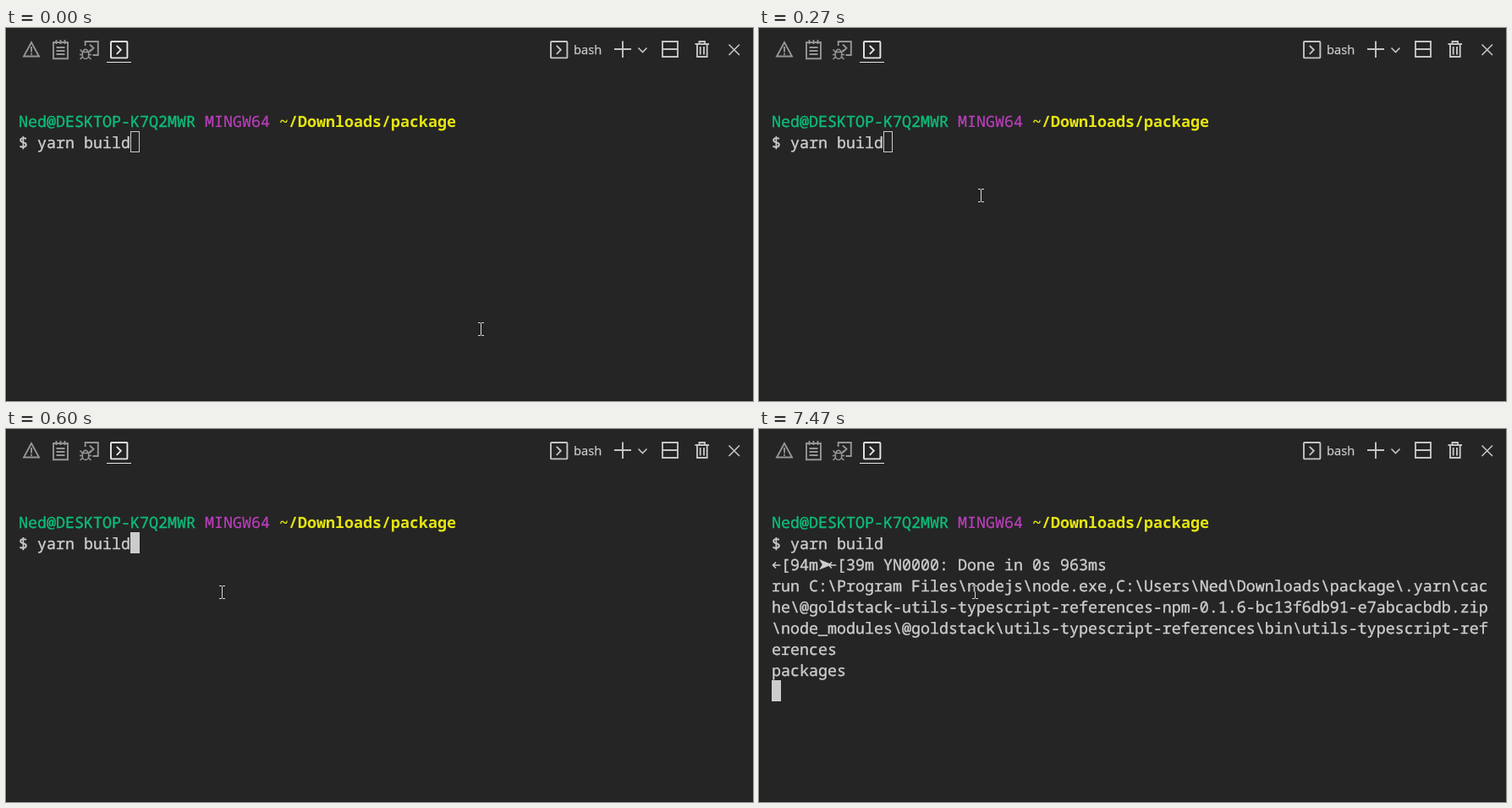
Write an HTML page that moves like this. It is 883 px wide and 441 px high and loops after 8000 ms.

```html
<!DOCTYPE html>
<html lang="en">
<head>
<meta charset="utf-8">
<title>Terminal build</title>
<style>
  html, body { margin: 0; width: 100%; height: 100%; overflow: hidden; background: #252525; }
  svg { display: block; width: 883px; height: 441px; }
  .term text { font: 18.333px "Noto Sans Mono", monospace; white-space: pre; fill: #ccc; stroke: #ccc;
    stroke-width: .4; font-variant-ligatures: none; text-rendering: geometricPrecision; }
  .term .user { fill: #0dbc79; stroke: #0dbc79; }
  .term .system { fill: #bc3fbc; stroke: #bc3fbc; stroke-width: .2; }
  .term .path { fill: #e5e510; stroke: none; font-weight: 700; }
  .label { font: 14.7px "Open Sans", sans-serif; fill: #ccc; stroke: #ccc; stroke-width: .25; }
  .icon { fill: none; stroke: #c5c5c5; stroke-width: 1.9; }
  .dim { stroke: #959595; }
  .active { stroke: #e7e7e7; }
  #pointer { mix-blend-mode: difference; fill: #fff; shape-rendering: crispEdges; }
</style>
</head>
<body>
<svg viewBox="0 0 883 441">
  <defs>
    <g id="shell">
      <rect x="1" y="1" width="19.4" height="19.4" rx="1"/>
      <path d="M7.8 5.8l5 5-5 5"/>
    </g>
  </defs>
  <rect width="883" height="441" fill="#252525"/>
  <path d="M.5 0V441M0 440.5H883" stroke="#1e1e1e"/>

  <!-- panel tabs -->
  <g class="icon dim">
    <path d="M30 17L39 33.5H21ZM30 22V28.5M30 29.8V31.8"/>
    <path d="M56 17H73V36.2H56ZM59.5 14V19M64.5 14V19M69.5 14V19M59.5 23H69.5M59.5 27H69.5M59.5 31H69.5"/>
    <path d="M93.7 21V16H108.8V32H102.5M99 19.5l4.5 4.3-4.5 4.3"/>
    <path d="M90.3 28.5H97.7V32.5a3.7 4 0 0 1-7.4 0ZM91.3 28.5a2.7 3.2 0 0 1 5.4 0M87 31.5H90.3M97.7 31.5H101M87.5 25.5l3 3M100.5 25.5l-3 3M87.5 37l3-3M100.5 37l-3-3" stroke-width="1.6"/>
  </g>
  <use href="#shell" x="123" y="15" class="icon active"/>
  <rect x="119" y="40" width="29" height="1" fill="#e7e7e7"/>

  <!-- panel actions -->
  <use href="#shell" x="643" y="15" class="icon"/>
  <text class="label" x="671" y="31">bash</text>
  <g class="icon">
    <path d="M729 15.5V35M719 25H739"/>
    <path d="M747.5 23.5l5 5 5-5" stroke-width="1.6"/>
    <path d="M776 16H794V34H776ZM776 25H794"/>
    <path d="M814.5 19H831M819.5 18.5V16H826V18.5M817 19V34H828.7V19M820.7 22V31.5M825 22V31.5"/>
    <path d="M854.5 19.5l12.5 12.5M867 19.5L854.5 32" stroke-width="1.6"/>
  </g>

  <g class="term">
    <text x="15" y="117"><tspan class="user">Ned@DESKTOP-K7Q2MWR</tspan> <tspan class="system">MINGW64</tspan> <tspan class="path">~/Downloads/package</tspan></text>
    <text x="15" y="142">$ yarn build</text>
    <g id="done">
      <text x="15" y="167"> [94m  [39m YN0000: Done in 0s 963ms</text>
      <path d="M71 154L86.5 160.3 71 166.5 74.8 160.3Z" fill="#ccc"/>
      <path id="arrow" d="M25.3 161H16.5M20 157.5l-3.5 3.5 3.5 3.5" fill="none" stroke="#ccc" stroke-width="1.6"/>
      <use href="#arrow" x="66"/>
    </g>
    <g id="run">
      <text x="15" y="192">run C:\Program Files\nodejs\node.exe,C:\Users\Ned\Downloads\package\.yarn\cac</text>
      <text x="15" y="217">he\@goldstack-utils-typescript-references-npm-0.1.6-bc13f6db91-e7abcacbdb.zip</text>
      <text x="15" y="242">\node_modules\@goldstack\utils-typescript-references\bin\utils-typescript-ref</text>
      <text x="15" y="267">erences</text>
      <text x="15" y="292">packages</text>
    </g>
  </g>

  <rect id="caret" x=".5" y=".5" width="10" height="24" stroke="#ccc"/>
  <path id="pointer" d="M-3-8h3v1h-3zM1-8h3v1h-3zM0-7h1v14h-1zM-3 7h3v1h-3zM1 7h3v1h-3z"/>
</svg>
<script>
  const LOOP = 8000;
  const $ = id => document.getElementById(id);

  // [start ms, x, y]
  const pointerSteps = [
    [0, 561, 356], [70, 440, 295], [130, 315, 230], [200, 277, 208],
    [270, 262, 198], [330, 257, 194], [400, 255, 193]
  ];
  // [start ms, column, row, filled]
  const caretSteps = [
    [0, 12, 1, false], [600, 12, 1, true], [1530, 0, 2, true],
    [5470, 0, 3, true], [7470, 0, 8, true]
  ];

  const stepAt = (steps, t) => steps.findLast(([start]) => start <= t);
  const move = (id, x, y) => $(id).setAttribute('transform', `translate(${x} ${y})`);
  const show = (id, on) => { $(id).style.visibility = on ? 'visible' : 'hidden'; };

  function render(t) {
    const [, x, y] = stepAt(pointerSteps, t);
    move('pointer', x, y);
    const [, column, row, filled] = stepAt(caretSteps, t);
    move('caret', 15 + column * 11, 97 + row * 25);
    $('caret').setAttribute('fill', filled ? '#ccc' : 'none');
    show('done', t >= 5470);
    show('run', t >= 7470);
  }

  const begin = performance.now();
  function tick() {
    render((performance.now() - begin) % LOOP);
    requestAnimationFrame(tick);
  }
  tick();
</script>
</body>
</html>
```
